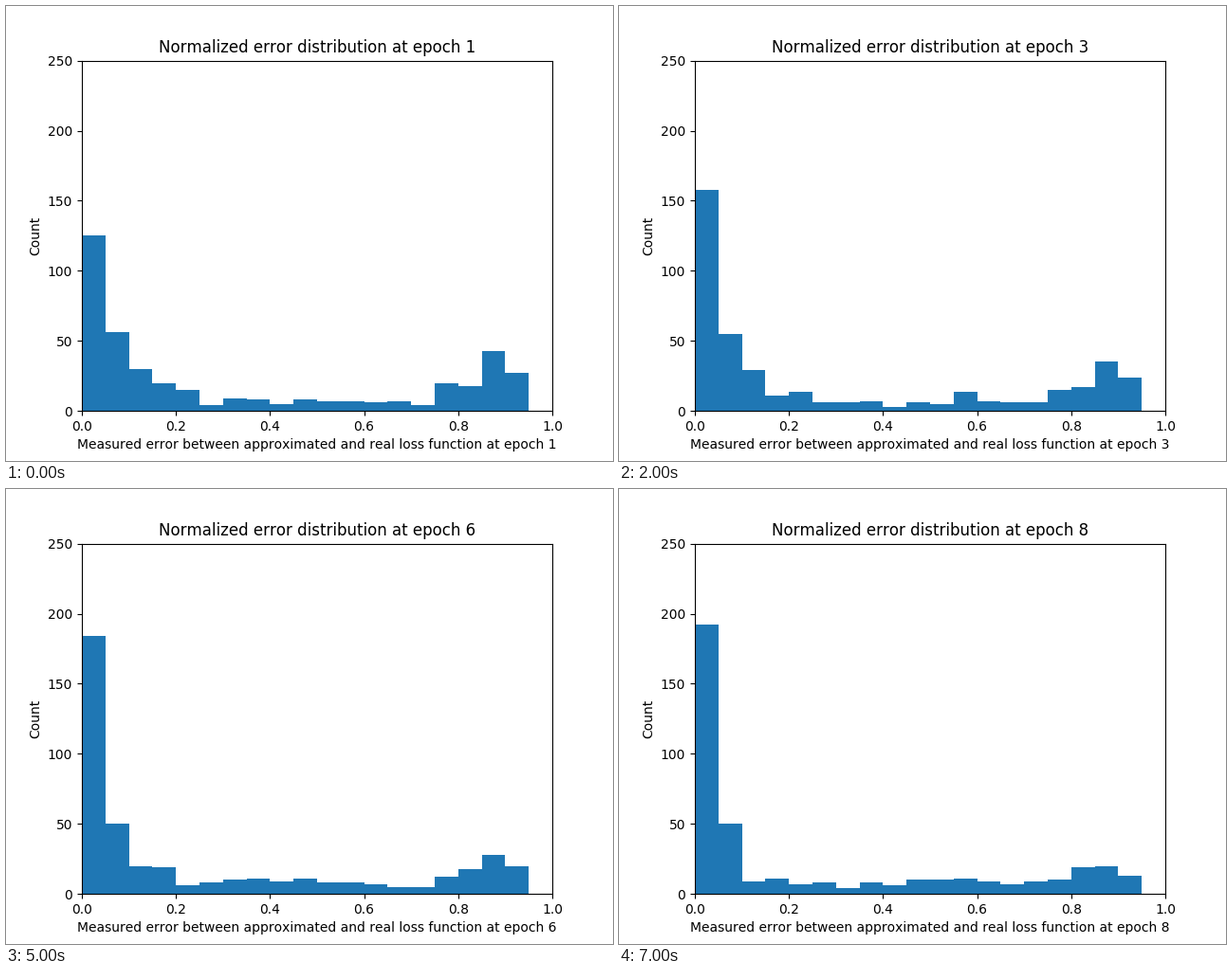
Recreate the animation shown at these times as a matplotlib script. Size 640 by 480 pixels, loop 8 s.

```python
import numpy as np
import matplotlib.pyplot as plt
from matplotlib.animation import FuncAnimation

EPOCHS = 8
BINS = 19
WIDTH = 0.05

# Key bins of the histogram beyond the two tallest, at the first and last epoch.
KEY_BINS = [2, 3, 4, 5, 14, 15, 16, 17, 18]
FIRST = [29, 18, 14, 7, 6, 20, 19, 42, 27]
LAST = [13, 14, 10, 9, 7, 7, 20, 19, 13]


def counts(epoch):
    """Errors gather in the lowest bin while the peak near 0.9 flattens."""
    lowest = np.interp(epoch, [1, 2, 3, 4, 6, 7, 8],
                       [125, 141, 158, 169, 184, 184, 192])
    second = np.interp(epoch, [1, 3, 4, 6], [56, 55, 47, 50])
    bins = np.arange(2, BINS)
    start = np.interp(bins, KEY_BINS, FIRST)
    end = np.interp(bins, KEY_BINS, LAST)
    progress = (epoch - 1) / (EPOCHS - 1)
    noise = np.random.default_rng(epoch).normal(0, 2.2, len(bins))
    rest = start + (end - start) * progress + noise
    return np.round([lowest, second, *np.maximum(rest, 1)])


plt.rcParams["font.family"] = "DejaVu Sans"
plt.rcParams["text.kerning_factor"] = 6  # whole-pixel letter spacing

fig, ax = plt.subplots(figsize=(6.4, 4.8), dpi=100)
bars = ax.bar(np.arange(BINS) * WIDTH, counts(1), width=WIDTH,
              align="edge", color="#1f77b4")
ax.set_xlim(0, 1)
ax.set_ylim(0, 250)
ax.set_ylabel("Count")


def draw(i):
    epoch = i + 1
    for bar, count in zip(bars, counts(epoch)):
        bar.set_height(count)
    ax.set_title(f"Normalized error distribution at epoch {epoch}")
    ax.set_xlabel("Measured error between approximated and real loss "
                  f"function at epoch {epoch}")


anim = FuncAnimation(fig, draw, frames=EPOCHS, interval=1000, repeat=True)
plt.show()
```
